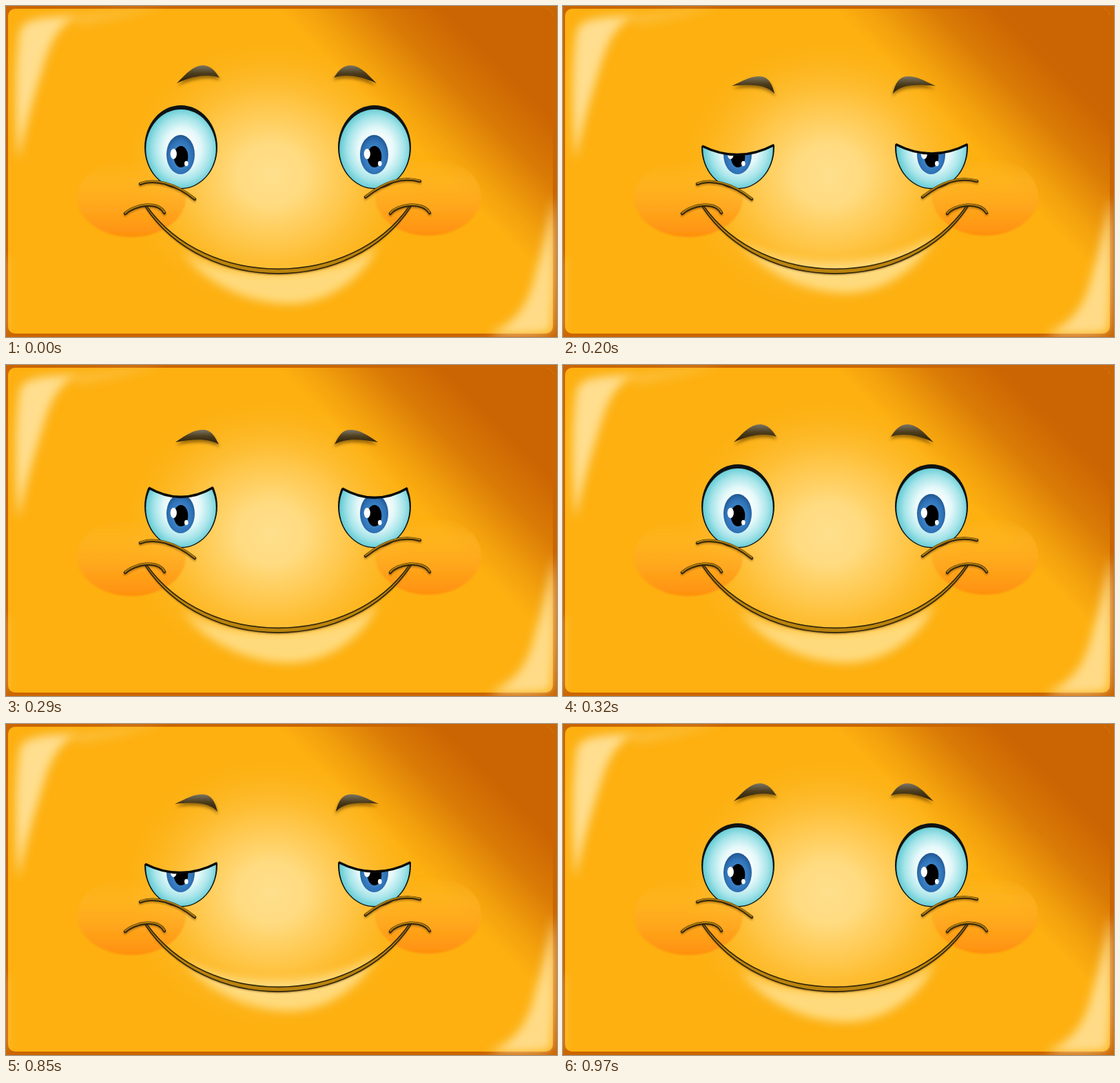
Write an HTML page that moves like this. It is 800x480 px and loops after 1.3 s.

```html
<!DOCTYPE html>
<html lang="en">
<head>
<meta charset="utf-8">
<title>Blinking smile</title>
<style>
  html, body { margin: 0; width: 100%; height: 100%; overflow: hidden; background: #cb6502; }
  svg { display: block; width: 100vw; height: 100vh; }
  .line { fill: none; stroke-linecap: round; }
  .dark { stroke: #33260a; stroke-width: 4.6; }
  .gold { stroke: #b27c0c; stroke-width: 2; }
  .lid { fill: none; stroke: #090909; stroke-width: 3.6; stroke-linejoin: round; }
</style>
</head>
<body>
<svg viewBox="0 0 800 480" preserveAspectRatio="none">
  <defs>
    <radialGradient id="glow" gradientUnits="userSpaceOnUse" cx="0" cy="0" r="1"
      gradientTransform="translate(385 245) scale(225 205)">
      <stop offset="0" stop-color="#ffdf8c"/>
      <stop offset=".22" stop-color="#ffdb80"/>
      <stop offset=".5" stop-color="#ffcb55" stop-opacity=".85"/>
      <stop offset=".78" stop-color="#fdbb2c" stop-opacity=".5"/>
      <stop offset="1" stop-color="#fdb010" stop-opacity="0"/>
    </radialGradient>
    <linearGradient id="shade" gradientUnits="userSpaceOnUse" x1="390" y1="0" x2="510" y2="-120">
      <stop offset="0" stop-color="#cb6402" stop-opacity="0"/>
      <stop offset=".22" stop-color="#cb6402" stop-opacity=".2"/>
      <stop offset=".6" stop-color="#cb6402" stop-opacity=".7"/>
      <stop offset="1" stop-color="#cb6402"/>
    </linearGradient>
    <linearGradient id="blush" x1="0" y1="0" x2="0" y2="1">
      <stop offset="0" stop-color="#ffb92a" stop-opacity="0"/>
      <stop offset=".3" stop-color="#ffb52a" stop-opacity=".55"/>
      <stop offset=".62" stop-color="#ffa51e" stop-opacity=".85"/>
      <stop offset="1" stop-color="#ff9010"/>
    </linearGradient>
    <radialGradient id="white" cx=".52" cy=".5" r=".52">
      <stop offset=".25" stop-color="#fff"/>
      <stop offset=".5" stop-color="#e4f8f9"/>
      <stop offset=".78" stop-color="#a5e4e9"/>
      <stop offset="1" stop-color="#62cbd4"/>
    </radialGradient>
    <radialGradient id="iris" cx=".5" cy=".56" r=".56">
      <stop offset=".4" stop-color="#3f86cc"/>
      <stop offset=".75" stop-color="#2f71b5"/>
      <stop offset="1" stop-color="#1e5590"/>
    </radialGradient>
    <linearGradient id="hair" x1="0" y1="0" x2="0" y2="1">
      <stop offset="0" stop-color="#7b7462"/>
      <stop offset=".45" stop-color="#4d3d1c"/>
      <stop offset="1" stop-color="#271a04"/>
    </linearGradient>
    <filter id="soft1" x="-20%" y="-60%" width="140%" height="220%"><feGaussianBlur stdDeviation="2"/></filter>
    <filter id="soft2" x="-30%" y="-30%" width="160%" height="160%"><feGaussianBlur stdDeviation="7"/></filter>
    <filter id="edge" x="-10%" y="-10%" width="120%" height="120%"><feGaussianBlur stdDeviation="1"/></filter>
    <clipPath id="panel"><rect x="3" y="4" width="791" height="471" rx="10"/></clipPath>
    <clipPath id="open0"><path/></clipPath>
    <clipPath id="open1"><path/></clipPath>

    <g id="eye">
      <ellipse cx="254" cy="204.7" rx="53" ry="60.7" fill="#101314"/>
      <ellipse cx="254" cy="207" rx="50.8" ry="57" fill="url(#white)"/>
      <ellipse cx="253.5" cy="215.5" rx="20.5" ry="28.5" fill="url(#iris)"/>
      <ellipse cx="254" cy="218.5" rx="10.3" ry="15.6"/>
      <ellipse cx="243.3" cy="214.5" rx="4.6" ry="7.6" fill="#fff"/>
      <ellipse cx="261.8" cy="228.5" rx="2.8" ry="3.7" fill="#fff"/>
    </g>
    <g id="brow">
      <path class="hair" fill="#5a3b05" opacity=".6" transform="translate(1 4)" filter="url(#soft1)"/>
      <path class="hair" fill="url(#hair)"/>
    </g>
    <path id="marks" d="M173 301C187 288 221 282 230 300M558 301C567 288 605 282 615 300M195 258C215 250 246 257 274 280M522 277C550 255 575 247 601 254"/>
    <path id="mouth" d="M202 291C288 420.5 502 420.5 588 291L585 291C500 411.5 291 411.5 205 291Z"/>
  </defs>

  <rect width="800" height="480" fill="#cb6502"/>
  <g clip-path="url(#panel)">
    <rect width="800" height="480" fill="#fdb010"/>
    <rect width="800" height="480" fill="url(#glow)"/>
    <rect width="800" height="480" fill="url(#shade)"/>
  </g>

  <g fill="#ffe7a6" filter="url(#soft2)">
    <path opacity=".85" d="M18 225C12 150 13 80 20 36C26 17 55 16 105 14C75 27 64 55 54 88C43 124 30 165 18 225Z"/>
    <path opacity=".8" d="M795 275C798 350 797 430 791 472C765 478 730 476 700 476C739 460 754 437 764 405C774 370 785 330 795 275Z"/>
    <path opacity=".25" d="M90 14L235 -2L170 16L110 28ZM-5 365H5V470H-5Z"/>
  </g>

  <ellipse cx="182" cy="278" rx="79" ry="57" fill="url(#blush)" filter="url(#edge)"/>
  <ellipse cx="613" cy="276" rx="77" ry="57" fill="url(#blush)" filter="url(#edge)"/>

  <path id="chin" fill="#ffde86" opacity=".92" filter="url(#soft2)"
    d="M255 354C310 399 475 402 540 346C520 396 465 432 412 432C350 432 286 400 255 354Z"/>

  <use href="#brow"/>
  <use href="#brow" transform="matrix(-1 0 0 1 786 0)"/>

  <g id="eyes">
    <g clip-path="url(#open0)"><use href="#eye"/></g>
    <g clip-path="url(#open1)"><use href="#eye" x="281"/></g>
  </g>
  <path class="lid"/>
  <path class="lid"/>

  <use href="#marks" class="line" stroke="#7a4a05" stroke-width="5" opacity=".45" y="2" filter="url(#edge)"/>
  <use href="#marks" class="line dark"/>
  <use href="#marks" class="line gold" y="-.8"/>
  <use href="#mouth" fill="#6b4308" opacity=".5" y="2" filter="url(#edge)"/>
  <use href="#mouth" fill="#b9830d" stroke="#33260a" stroke-width="1.7" stroke-linejoin="round"/>
</svg>
<script>
  const $ = s => document.querySelector(s);
  const $$ = s => [...document.querySelectorAll(s)];

  // Lids: x1, y1, x2, y2 and control y, for the left and the right eye
  const poses = [
    { brow: 'M248 112C262 98 272 86 287 86C298 87 304 95 310 104C297 99 275 99 248 112Z', chin: 0 },
    { brow: 'M246 112C262 101 272 94 286 94C299 94 303 104 309 115C296 107 275 106 246 112Z', chin: 0,
      lids: [[207, 178, 301, 177.5, 205], [488, 179, 583, 178.5, 206]] },
    { brow: 'M245 116C262 108 272 102 285 102C299 102 304 114 307 127C295 114 275 113 245 116Z', chin: -16,
      lids: [[202, 203, 306.5, 201.5, 229], [483, 200.5, 587.5, 200.5, 227.5]] },
    { brow: 'M244 121C261 115 272 110 284 110C298 111 303 124 305 138C294 122 274 119 244 121Z', chin: -16,
      lids: [[203, 226, 305, 225, 302], [484, 225, 586, 225, 302]], shut: true }
  ];
  const blink = [1, 2, 3, 2, 1];
  const lids = $$('.lid');
  let shown = -1;

  function poseAt(t) {
    for (const start of [170, 820]) {
      const i = Math.floor((t - start) / 30);
      if (i >= 0 && i < blink.length) return blink[i];
    }
    return 0;
  }

  function show(n) {
    const p = poses[n];
    $$('.hair').forEach(h => h.setAttribute('d', p.brow));
    $('#chin').setAttribute('transform', `translate(0 ${p.chin})`);
    $('#eyes').style.visibility = p.shut ? 'hidden' : 'visible';
    lids.forEach((lid, i) => {
      let curve = '', area = 'M0 0H800V480H0Z';
      if (p.lids) {
        const [x1, y1, x2, y2, cy] = p.lids[i];
        curve = `M${x1} ${y1}Q${(x1 + x2) / 2} ${cy} ${x2} ${y2}`;
        area = `${curve}L${x2 + 9} ${y2}V300H${x1 - 9}V${y1}Z`;
      }
      lid.setAttribute('d', curve);
      $(`#open${i} path`).setAttribute('d', area);
    });
  }

  function tick() {
    const n = poseAt(performance.now() % 1300);
    if (n !== shown) show(shown = n);
    requestAnimationFrame(tick);
  }
  tick();
</script>
</body>
</html>
```
